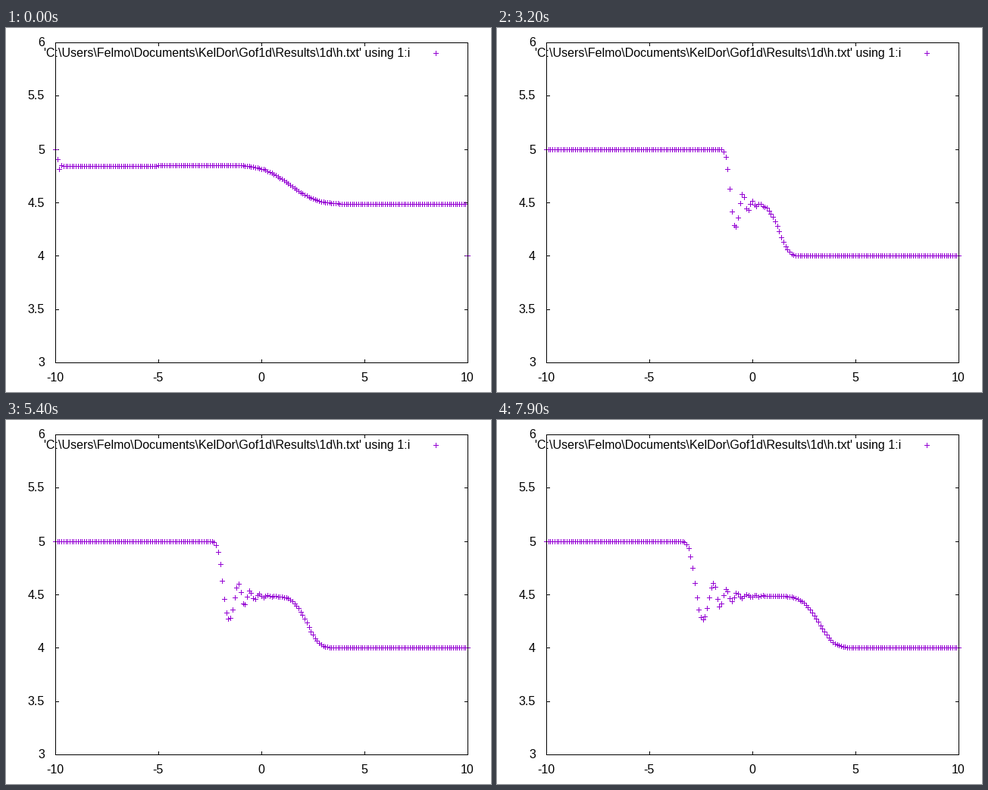
A matplotlib script that plays this animation: 640x480 px, repeating every 8000 ms.

```python
import math

import numpy as np
import matplotlib.pyplot as plt
from matplotlib.animation import FuncAnimation
from matplotlib.collections import PolyCollection

W, H, DPI = 640, 480, 100
LEFT, RIGHT, TOP, BOTTOM = 65, 609, 19, 441
FRAMES, INTERVAL = 80, 100
STEPS = FRAMES - 2
PURPLE = "#9400d3"
LABEL = r"'C:\Users\Felmo\Documents\KelDor\Gof1d\Results\1d\h.txt' using 1:i"

X = np.linspace(-10, 10, 201)
HIGH, MID, LOW = 5, 4.486, 4


def normal_cdf(z):
    return np.array([0.5 * (1 + math.erf(v / math.sqrt(2))) for v in z])


def left_wave(n):
    """Dispersive wave running left: steep front, then Airy-like ripples."""
    age, root = n / STEPS, n ** (1 / 3)
    j = np.arange(16)
    airy = (3 * np.pi * (4 * j + 3) / 8) ** (2 / 3)
    knots = -.0349 * n + root * (.0545 * airy - .032 - .015 * (-.4) ** j)
    heights = MID - .195 * (-.7) ** j * age ** (.23 * j) - .023 * .5 ** j

    # Cosine easing from one extremum to the next
    pos = np.interp(X, knots, j)
    i = np.minimum(pos.astype(int), len(j) - 2)
    w = (1 - np.cos(np.pi * (pos - i))) / 2
    ripples = heights[i] * (1 - w) + heights[i + 1] * w

    r = np.maximum((knots[0] - X) / (.0615 * root + .0019 * n), 0)
    r = np.where(r > 1, 1 + (r - 1) * age ** .17, r)
    front = HIGH - (HIGH - heights[0]) * np.exp(-.604 * r ** 2.45)
    return np.where(r > 0, front, ripples)


def right_wave(n):
    """Diffusive wave running right: drop from the middle level."""
    d = X - .0411 * n
    sigma = .068 * math.sqrt(n) * np.where(d > 0, .95, 1.09)
    return (MID - LOW) * normal_cdf(d / sigma)


def settled():
    """State after a long run, with a short kink at the left boundary."""
    h = 4.84 + .01 * normal_cdf(X + 5) - .364 * normal_cdf((X - 1.36) / 1.03)
    h[:4] = HIGH, 4.905, 4.81, 4.85
    h[-1] = LOW
    return h


def heights_at(frame):
    if frame == 0:
        return settled()
    n = frame - 1
    if n == 0:
        return np.where(X < .05, HIGH, LOW)
    return left_wave(n) - right_wave(n)


def px(x):
    return np.floor(LEFT + (x + 10) * (RIGHT - LEFT) / 20 + .5)


def py(h):
    return BOTTOM - np.floor((h - 3) * (BOTTOM - TOP) / 3 + .5)


def rect(x, y, w, h):
    return [(x, y), (x + w, y), (x + w, y + h), (x, y + h)]


def plus(x, y):
    return [rect(x - 3, y, 7, 1), rect(x, y - 3, 1, 7)]


def crosses(h):
    return [bar for x, y in zip(px(X), py(h)) for bar in plus(x, y)]


def add_rects(rects, color, z):
    coll = PolyCollection(rects, facecolors=color, edgecolors="none",
                          linewidths=0, antialiaseds=False, zorder=z)
    ax.add_collection(coll, autolim=False)
    return coll


def label(x, y, s, ha):
    ax.text(x, y, s, ha=ha, va="baseline", family="Liberation Sans",
            size=16 * 72 / DPI, color="black", zorder=4)


fig = plt.figure(figsize=(W / DPI, H / DPI), dpi=DPI, facecolor="white")
ax = fig.add_axes([0, 0, 1, 1])
ax.set_xlim(0, W)
ax.set_ylim(H, 0)
ax.axis("off")

ticks = []
for v in range(-10, 11, 5):
    x = px(v)
    ticks += [rect(x, TOP, 1, 5), rect(x, BOTTOM - 4, 1, 5)]
    label(x - .5, 465.5, str(v), "center")
for v in np.arange(3, 6.5, .5):
    y = py(v)
    ticks += [rect(LEFT, y, 5, 1), rect(RIGHT - 4, y, 5, 1)]
    label(51, y + 5.5, f"{v:g}", "right")

# Points cover the ticks, the border covers the points
wide, tall = RIGHT - LEFT + 1, BOTTOM - TOP + 1
border = [rect(LEFT, TOP, wide, 1), rect(LEFT, BOTTOM, wide, 1),
          rect(LEFT, TOP, 1, tall), rect(RIGHT, TOP, 1, tall)]
add_rects(ticks, "black", 1)
points = add_rects(crosses(heights_at(0)), PURPLE, 2)
add_rects(border, "black", 3)
add_rects(plus(567, 33), PURPLE, 3)
label(533, 38, LABEL, "right")


def update(frame):
    points.set_verts(crosses(heights_at(frame)))
    return [points]


anim = FuncAnimation(fig, update, frames=FRAMES, interval=INTERVAL,
                     repeat=True, repeat_delay=0, blit=False)
plt.show()
```
